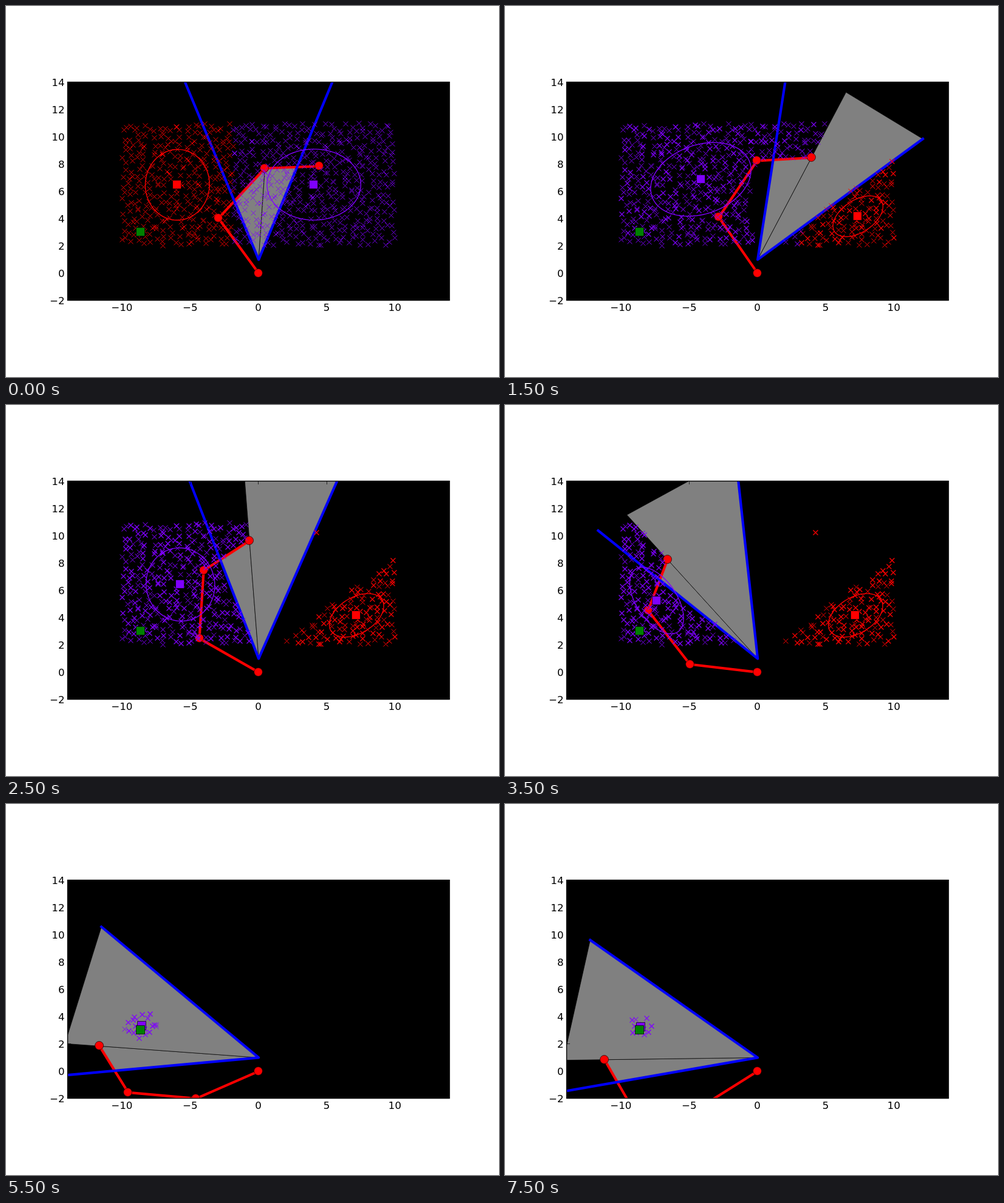
These frames come from a looping animation (812x612 px, 8000 ms). An HTML page with a canvas:

```html
<!DOCTYPE html>
<html lang="en">
<head>
<meta charset="utf-8">
<title>Arm search</title>
<style>
html, body { margin: 0; width: 100%; height: 100%; overflow: hidden; background: #fff; }
canvas, svg { position: absolute; left: 0; top: 0; width: 812px; height: 612px; }
text { font: 16.67px "DejaVu Sans", sans-serif; fill: #000; }
</style>
</head>
<body>
<canvas id="plot" width="812" height="612"></canvas>
<svg id="labels" viewBox="0 0 812 612"></svg>
<script>
const ctx = document.getElementById('plot').getContext('2d');
const STEP = 500, STEPS = 16;
const FOUND = 9; // step at which the goal comes into view
const UNIT = 22.475, RAD = Math.PI / 180;
const X = x => 416.15 + x * UNIT;
const Y = y => 440.85 - y * UNIT;
const snap = v => Math.round(v) - .5;
const RED = '#f00', PURPLE = '#7f00ff', BLUE = '#00f', GREEN = '#008000';

const BASE = [X(0), Y(0)], EYE = [X(0), Y(1)], GOAL = [221.5, 372.5];
const LINKS = [5, 5, 4];
const HALF = 22.5, RANGE = 15 * UNIT;

// Key poses: step, ease power on the way there, absolute link angles
const POSES = [
  [0, 1, 126.1, 47.1, 2.2], [3, 1, 124.7, 56, 3.2], [5, 3.5, 150.3, 86.4, 33],
  [7, 1, 173.3, 127.8, 69.1], [9, .6, 190.3, 155.9, 101.6],
  [11, .85, 203.6, 174.9, 121.7], [15, .4, 212.1, 179.6, 119.8]
];

// The view swings right, then back left at 15 degrees a step, then settles
function headingAt(step) {
  if (step < 3) return Math.min(90, 58.7 + 15 * (3 - step));
  if (step < 11) return 58.7 + 15 * (step - 3);
  return 167.4 - 4.7 * Math.exp(-1.7 * (step - 11));
}

function anglesAt(step) {
  const i = Math.max(1, POSES.findIndex(k => k[0] >= step));
  const [from, , ...a] = POSES[i - 1], [to, power, ...b] = POSES[i];
  const u = ((step - from) / (to - from)) ** power;
  return a.map((v, k) => v + (b[k] - v) * u);
}

function polar([x, y], deg, dist) {
  return [x + dist * Math.cos(deg * RAD), y - dist * Math.sin(deg * RAD)];
}

function armAt(step) {
  const joints = [BASE];
  anglesAt(step).forEach((deg, i) => joints.push(polar(joints[i], deg, LINKS[i] * UNIT)));
  return joints;
}

function bearing([x, y]) {
  const a = Math.atan2(EYE[1] - y, x - EYE[0]) / RAD;
  return a < -90 ? a + 360 : a;
}

// Distance seen along a ray until the arm or the flat far side stops it
function cast(deg, joints, heading) {
  const dx = Math.cos(deg * RAD), dy = -Math.sin(deg * RAD);
  let best = RANGE * Math.cos(HALF * RAD) / Math.cos((deg - heading) * RAD);
  for (let i = 0; i < joints.length - 1; i++) {
    const [ax, ay] = joints[i], [bx, by] = joints[i + 1];
    const ex = bx - ax, ey = by - ay, det = dx * ey - dy * ex;
    if (Math.abs(det) < 1e-9) continue;
    const px = ax - EYE[0], py = ay - EYE[1];
    const dist = (px * ey - py * ex) / det;
    const u = (px * dy - py * dx) / det;
    if (dist > 0 && u >= 0 && u <= 1) best = Math.min(best, dist);
  }
  return best;
}

function viewAt(step) {
  const joints = armAt(step), heading = headingAt(step);
  const left = heading + HALF, right = heading - HALF;
  const inner = joints.slice(1).map(bearing).filter(a => a < left && a > right);
  const cuts = [left, ...inner.sort((a, b) => b - a), right];
  const facets = [];
  for (let i = 0; i < cuts.length - 1; i++) {
    const ends = [cuts[i] - .001, cuts[i + 1] + .001];
    facets.push([EYE, ...ends.map(a => polar(EYE, a, cast(a, joints, heading)))]);
  }
  return { joints, heading, left, right, facets };
}

const views = Array.from({ length: STEPS }, (_, step) => viewAt(step));

function isSeen(p, { joints, heading, left, right }) {
  const a = bearing(p);
  const dist = Math.hypot(p[0] - EYE[0], p[1] - EYE[1]);
  return a < left && a > right && dist < cast(a, joints, heading);
}

// Seen places are ruled out; once the goal is found the cloud shrinks around it
function survives(p, step) {
  if (step < FOUND) return step < 2 || !isSeen(p, views[step]);
  const far = Math.hypot(p[0] - 224, (p[1] - 367) / .85);
  return bearing(p) < views[FOUND].left && far < 20 + 40 * Math.exp(-.7 * (step - FOUND));
}

function lifeOf(p) {
  let step = 0;
  while (step < STEPS && survives(p, step)) step++;
  return step;
}

let seed = 20117;
function rand() {
  seed = (seed * 1664525 + 1013904223) >>> 0;
  return seed / 4294967296;
}

// One jittered particle per cell of the search area
const COLS = 40, ROWS = 20, particles = [];
for (let i = 0; i < COLS * ROWS; i++) {
  const col = i % COLS + rand(), row = Math.floor(i / COLS) + rand();
  const p = [X(col / COLS * 20 - 10), Y(2 + row / ROWS * 9)];
  particles.push({ p, life: lifeOf(p), weight: rand() });
}

function particleColor([x, y], step) {
  if (step < 3) return x < 375 ? RED : PURPLE;
  if (step === 3) return x < 488 || y < 250 ? PURPLE : RED;
  return x < 440 ? PURPLE : RED;
}

// Mean and spread of a group of points
function clusterOf(points) {
  const mean = f => points.reduce((sum, p) => sum + f(p), 0) / points.length;
  const cx = mean(p => p[0]), cy = mean(p => p[1]);
  const sx = Math.sqrt(mean(p => (p[0] - cx) ** 2));
  const sy = Math.sqrt(mean(p => (p[1] - cy) ** 2));
  const rho = mean(p => (p[0] - cx) * (p[1] - cy)) / (sx * sy);
  return { cx, cy, sx, sy, rho };
}

function path(points, close) {
  ctx.beginPath();
  points.forEach(([x, y]) => ctx.lineTo(x, y));
  if (close) ctx.closePath();
}

function stroke(color, width) {
  ctx.strokeStyle = color;
  ctx.lineWidth = width;
  ctx.stroke();
}

function fillEdged(color) {
  ctx.fillStyle = color;
  ctx.fill();
  stroke('#000', .7);
}

function square(x, y, color) {
  ctx.beginPath();
  ctx.rect(snap(x) - 7, snap(y) - 7, 14, 14);
  fillEdged(color);
}

function ellipse({ cx, cy, sx, sy, rho }, color) {
  const k = Math.sqrt(1 - rho * rho), ring = [];
  for (let a = 0; a < 360; a += 4) {
    const c = Math.cos(a * RAD), s = Math.sin(a * RAD);
    ring.push([cx + sx * c, cy + sy * (rho * c + k * s)]);
  }
  path(ring, true);
  stroke(color, 1.39);
}

function drawArm(joints) {
  path(joints);
  stroke(RED, 4.17);
  for (const [x, y] of joints) {
    ctx.beginPath();
    ctx.arc(snap(x), snap(y), 6.95, 0, 2 * Math.PI);
    fillEdged(RED);
  }
}

function drawView({ facets, joints, left, right }) {
  for (const f of facets) {
    path(f, true);
    fillEdged('#808080');
  }
  drawArm(joints);
  ctx.lineCap = 'square';
  path([polar(EYE, left, RANGE), EYE, polar(EYE, right, RANGE)]);
  stroke(BLUE, 4.17);
  ctx.lineCap = 'butt';
}

function drawParticles(alive, step) {
  const r = 4, grow = Math.min(1, step / FOUND);
  for (const { p, weight } of alive) {
    const x = snap(p[0]), y = snap(p[1]);
    ctx.beginPath();
    ctx.moveTo(x - r, y - r);
    ctx.lineTo(x + r, y + r);
    ctx.moveTo(x - r, y + r);
    ctx.lineTo(x + r, y - r);
    stroke(particleColor(p, step), .9 + .7 * grow * weight);
  }
}

function drawClusters(alive, step) {
  for (const color of [RED, PURPLE]) {
    const points = alive.map(a => a.p).filter(p => particleColor(p, step) === color);
    if (!points.length) continue;
    const cluster = clusterOf(points);
    if (step < FOUND) ellipse(cluster, color);
    square(cluster.cx, cluster.cy, color);
  }
}

function drawAxes() {
  ctx.strokeStyle = '#000';
  ctx.lineWidth = 1.39;
  ctx.strokeRect(101.5, 125.5, 629, 360);
  ctx.beginPath();
  const tick = (x, y, dx, dy) => { ctx.moveTo(x, y); ctx.lineTo(x + dx, y + dy); };
  for (let v = -10; v <= 10; v += 5) {
    tick(snap(X(v)), 125.5, 0, 5.5);
    tick(snap(X(v)), 485.5, 0, -5.5);
  }
  for (let v = -2; v <= 14; v += 2) {
    tick(101.5, snap(Y(v)), 5.5, 0);
    tick(730.5, snap(Y(v)), -5.5, 0);
  }
  stroke('#000', .7);
}

function draw(step) {
  const alive = particles.filter(a => step < a.life);
  ctx.fillStyle = '#fff';
  ctx.fillRect(0, 0, 812, 612);
  ctx.fillStyle = '#000';
  ctx.fillRect(101, 125, 630, 361);

  ctx.save();
  ctx.beginPath();
  ctx.rect(101.5, 126, 629, 359.5);
  ctx.clip();
  ctx.lineJoin = 'round';
  drawView(views[step]);
  drawParticles(alive, step);
  drawClusters(alive, step);
  square(...GOAL, GREEN);
  ctx.restore();
  drawAxes();
}

function label(value, x, y, anchor) {
  const t = document.createElementNS('http://www.w3.org/2000/svg', 'text');
  t.setAttribute('x', x);
  t.setAttribute('y', Math.round(y));
  t.setAttribute('text-anchor', anchor);
  t.textContent = String(value).replace('-', '\u2212');
  document.getElementById('labels').append(t);
}
for (let v = -10; v <= 10; v += 5) label(v, X(v) - .5, 503, 'middle');
for (let v = -2; v <= 14; v += 2) label(v, 96.5, Y(v) + 6, 'end');

const start = performance.now();
let shown = -1;
function tick() {
  const step = Math.floor((performance.now() - start) / STEP) % STEPS;
  if (step !== shown) draw(shown = step);
  requestAnimationFrame(tick);
}
tick();
</script>
</body>
</html>
```
